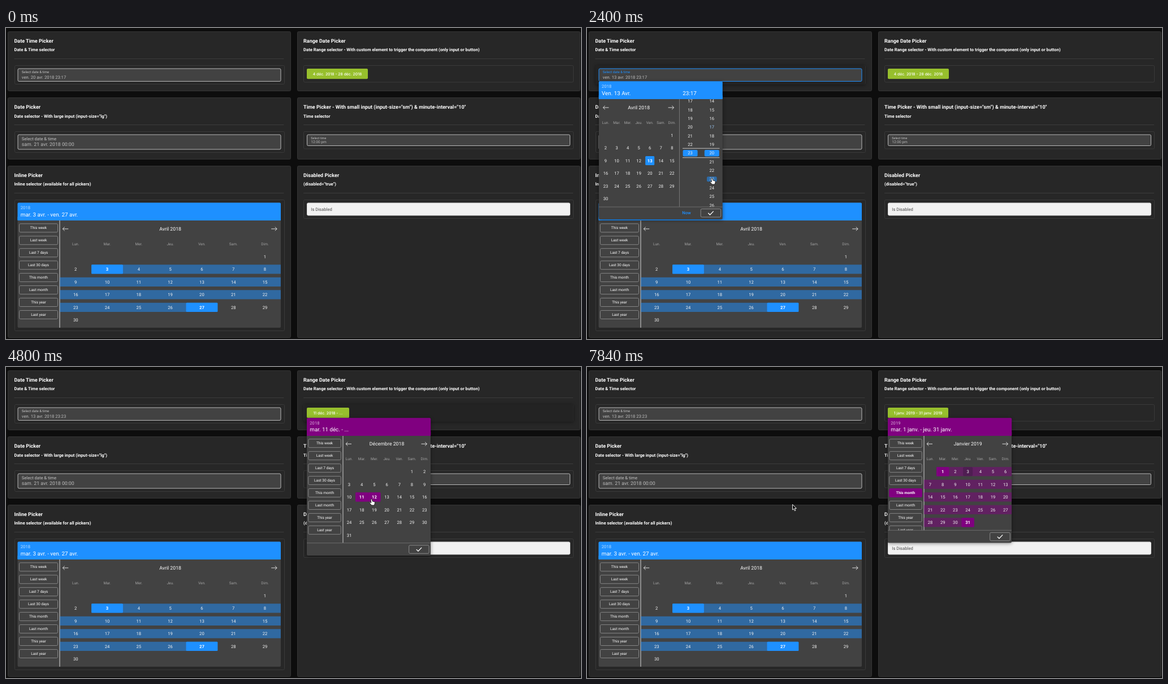
Recreate the animation shown at these times as an HTML page. Size 1017 by 551 pixels, loop 8 s.

```html
<!DOCTYPE html>
<html lang="en">
<head>
<meta charset="utf-8">
<title>Date pickers</title>
<style>
  html, body { margin: 0; width: 100%; height: 100%; overflow: hidden; background: #0d0d0d; }
  svg { display: block; }
  text { font-family: Roboto, sans-serif; text-rendering: geometricPrecision; white-space: pre; }
  .btn { font-family: Inter, sans-serif; }
  .shadow { filter: drop-shadow(0 1px 3px rgba(0, 0, 0, .45)); }
</style>
</head>
<body>
<svg id="stage" width="1017" height="551" viewBox="0 0 1017 551">
  <g id="page"></g>
  <g id="live"></g>
</svg>
<script>
const LOOP = 8000, STEP = 160;
const BLUE = '#1e90ff', PURPLE = '#800080', PANEL = '#424242';
const DAYS = ['lun.', 'mar.', 'mer.', 'jeu.', 'ven.', 'sam.', 'dim.'];
const SHORTCUTS = ['This week', 'Last week', 'Last 7 days', 'Last 30 days',
  'This month', 'Last month', 'This year', 'Last year'];
const APRIL = { name: 'Avril', short: 'avr.', year: 2018, off: 6, len: 30 };
const DECEMBER = { name: 'Décembre', short: 'déc.', year: 2018, off: 5, len: 31 };
const JANUARY = { name: 'Janvier', short: 'janv.', year: 2019, off: 1, len: 31, today: 3 };

// Timelines: the last row whose time has passed applies.
const POPUP1 = [[0, 0, 0], [800, .45, -4.5], [960, .87, -1.7], [1120, 1, 0], [3840, .4, -4], [4000, 0, 0]];
const POPUP2 = [[0, 0, 0], [4000, .6, -4], [4160, 1, -.4], [4320, 1, 0]];
const SCROLL = [[0, 17], [2400, 20], [2560, 22.6], [2720, 23]];
const RANGE = [[0, DECEMBER, 4, 28], [4640, DECEMBER, 11, 0], [5280, DECEMBER, 11, 21],
  [5920, DECEMBER, 1, 31, 5], [6720, JANUARY, 1, 31, 4]];
const BOTTOM = [[0, 334], [6720, 322], [6880, 311.5]];
const CLICKS = [640, 1760, 2240, 3680, 3840, 4640, 5280, 5920, 6720];
// time, x, y, hand
const MOUSE = [[320, 190, 56, 0], [640, 114.3, 85.5, 1], [1120, 114.3, 85.5, 1], [1600, 111, 234, 1],
  [1920, 111, 234, 1], [2240, 221, 266, 1], [2880, 221, 266, 1], [3520, 654, 101, 0],
  [3680, 654, 101, 0], [3840, 618, 82, 1], [4000, 612, 100, 1], [4160, 600, 199.5, 1],
  [4480, 629, 228, 1], [4640, 629, 228, 1], [5120, 696, 251, 1], [5280, 696, 251, 1],
  [5600, 578, 249.5, 1], [5920, 572, 247, 1], [6240, 572, 247, 1], [6720, 566, 224, 1],
  [7360, 566, 224, 1], [7840, 364.5, 244, 0]];

const at = (table, t) => table.filter(row => row[0] <= t).pop().slice(1);

function mouseAt(t) {
  const i = MOUSE.findIndex(k => k[0] >= t);
  if (t < MOUSE[0][0]) return null;
  const b = MOUSE[i], a = MOUSE[Math.max(0, i - 1)];
  const p = b === a ? 1 : (t - a[0]) / (b[0] - a[0]);
  const e = p * p * (3 - 2 * p);
  return { x: a[1] + (b[1] - a[1]) * e, y: a[2] + (b[2] - a[2]) * e, hand: p > .3 ? b[3] : a[3] };
}

// Drawing helpers
const text = (x, y, s, size, o = {}) =>
  `<text x="${x}" y="${y}" font-size="${size}" fill="${o.fill || '#fff'}" font-weight="${o.weight || 400}"` +
  ` text-anchor="${o.mid ? 'middle' : 'start'}" class="${o.cls || ''}">${s.replace(/&/g, '&amp;')}</text>`;

const rect = (x, y, w, h, fill, o = {}) =>
  `<rect x="${x}" y="${y}" width="${w}" height="${h}" rx="${o.r || 0}" fill="${fill}"` +
  ` opacity="${o.alpha || 1}" class="${o.cls || ''}"/>`;

const frame = (x, y, w, h, stroke, fill = 'none', r = 2) =>
  `<rect x="${x + .5}" y="${y + .5}" width="${w - 1}" height="${h - 1}" rx="${r}" fill="${fill}" stroke="${stroke}"/>`;

const path = (d, stroke, width = 1, fill = 'none') =>
  `<path d="${d}" stroke="${stroke}" stroke-width="${width}" fill="${fill}"/>`;

const clip = (x, y, w, h, body) =>
  `<svg x="${x}" y="${y}" width="${w}" height="${h}" viewBox="${x} ${y} ${w} ${h}">${body}</svg>`;

const arrow = (x, y, d) => path(`M${x - 5 * d} ${y}h${10 * d}m${-3.4 * d} -3.3l${3.4 * d} 3.3l${-3.4 * d} 3.3`, '#eee', .9);

function input(x, y, h, label, value, sizes, lines, focus) {
  return frame(x, y, 466, h, focus ? BLUE : '#b8b8b8', PANEL) +
    text(x + 7.3, y + lines[0], label, sizes[0], { fill: focus ? BLUE : '#c4c4c4' }) +
    text(x + 7.3, y + lines[1], value, sizes[1], { fill: '#bcbcbc' });
}

function dayAt(cal, m) {
  if (!m) return 0;
  const col = Math.round((m.x - cal.x) / cal.pitch);
  const row = Math.round((m.y - cal.y - 49) / 22.5);
  if (col < 0 || col > 6 || row < 0 || Math.abs(m.y - cal.y - 49 - row * 22.5) > 8) return 0;
  const d = row * 7 + col - cal.month.off + 1;
  return d > 0 && d <= cal.month.len ? d : 0;
}

function calendar(cal, from, to, accent, hover) {
  const { x, y, pitch, month } = cal;
  const mid = x + 3 * pitch;
  const spot = d => {
    const n = d + month.off - 1;
    return [x + n % 7 * pitch, y + 49 + Math.floor(n / 7) * 22.5];
  };
  let s = arrow(cal.left, y, -1) + arrow(cal.right, y, 1) +
    text(mid, y + 3, `${month.name} ${month.year}`, 8.75, { mid: 1 });
  DAYS.forEach((d, i) => {
    s += text(x + i * pitch, y + 28.9, d[0].toUpperCase() + d.slice(1), 6.56, { mid: 1, fill: '#a3a3a3' });
  });
  if (to > from) {
    for (let d = from; d <= to;) {
      const [cx, cy] = spot(d);
      const n = Math.min(7 - (d + month.off - 1) % 7, to - d + 1);
      s += rect(cx - pitch / 2, cy - 8.1, n * pitch, 16.2, accent, { alpha: .5 });
      d += n;
    }
  }
  for (let d = 1; d <= month.len; d++) {
    const [cx, cy] = spot(d);
    const on = d === from || d === to;
    const w = on && to > from ? pitch : 16;
    if (on) s += rect(cx - w / 2, cy - 8.1, w, 16.2, accent, { r: 1.5 });
    else if (d === hover) s += rect(cx - 8, cy - 8, 16, 16, accent, { r: 2, alpha: .5 });
    else if (d === month.today) s += rect(cx - 8.5, cy - 8, 17, 16, '#4b1c4f', { r: 2, alpha: .8 });
    s += text(cx, cy + 2.7, String(d), 7.66, { mid: 1, weight: on ? 700 : 400, fill: on ? '#fff' : '#f2f2f2' });
  }
  return s;
}

function shortcuts(x, y, w, accent, active, m, before) {
  return SHORTCUTS.map((label, i) => {
    const top = y + i * 21.95;
    const inside = p => p && p.x > x && p.x < x + w && p.y > top && p.y < top + 15.5;
    const on = i === active;
    let s = frame(x, top, w, 16, on ? accent : '#858585', on ? accent : 'none');
    if (!on && inside(m)) {
      const gap = inside(before) ? .5 : 5.5;
      s += rect(x + gap, top + 1, w - 2 * gap, 14, accent, { r: 2, alpha: .5 });
    }
    return s + text(x + w / 2, top + 10.1, label, 6.56, { mid: 1, weight: on ? 700 : 400 });
  }).join('');
}

const header = (x, y, w, accent, year, line) =>
  rect(x, y, w, 31.5, accent, { r: 2 }) + rect(x, y + 25, w, 6.5, accent) +
  text(x + 5.3, y + 11.5, String(year), 7.66, { fill: 'rgba(255,255,255,.7)' }) +
  text(x + 5.3, y + 24, line, 9.8);

const okButton = (x, y) => frame(x, y, 36.5, 15.5, '#8a8a8a') +
  path(`M${x + 13.6} ${y + 7.8}l3.2 3.2l6.2 -6.4`, '#fff', 1.3);

const rangeText = (m, a, b) => {
  const one = d => `${DAYS[(m.off + d - 1) % 7]} ${d} ${m.short}`;
  return `${one(a)} - ${b ? one(b) : '...'}`;
};

const openBox = (x, y, w, h) => rect(x, y, w, h, '#232323', { cls: 'shadow', r: 2 });

// Everything that never changes
function drawPage() {
  const cards = [
    [0, 26, 112, 100, 'Date Time Picker', 'Date & Time selector'],
    [1, 26, 112, 96.5, 'Range Date Picker', 'Date Range selector - With custom element to trigger the component (only input or button)'],
    [0, 143.3, 233, 221, 'Date Picker', 'Date selector - With large input (input-size="lg")'],
    [1, 143.3, 233, 214.5, 'Time Picker - With small input (input-size="sm") & minute-interval="10"', 'Time selector'],
    [0, 264, 549, 537, 'Inline Picker', 'Inline selector (available for all pickers)'],
    [1, 264, 549, 338, 'Disabled Picker', '(disabled="true")']];
  let s = rect(0, 0, 1017, 551, '#0d0d0d');
  for (const [col, y, bottom, box, title, sub] of cards) {
    const x = 3 + col * 511.6, top = Math.round(y - 20);
    s += frame(Math.round(x), top, 501, bottom - top, '#353535', '#272727') +
      text(x + 11.5, y, title, 9, { weight: 700 }) +
      text(x + 11.5, y + 15.3, sub, 7.68, { weight: 700 }) +
      rect(x + 11.5, Math.round(y + 28), 477, 1, '#3c3c3c') +
      frame(Math.round(x + 11.6), Math.round(y + 40), 478, box - Math.round(y + 40), '#3a3a3a');
  }
  s += input(20.5, 188.5, 27, 'Select date & time', 'sam. 21 avr. 2018 00:00', [7.6, 8.75], [10.3, 20.5]) +
    input(532, 188.5, 20.5, 'Select time', '12:00 pm', [5.47, 6.56], [8, 15.8]) +
    frame(532, 309.5, 466, 23, '#d8d8d8', '#f2f2f2') +
    text(539.3, 323.9, 'Is Disabled', 7.66, { fill: '#4a4a4a' });
  s += rect(20.5, 309.5, 465.5, 221.5, PANEL, { r: 2 }) +
    header(20.5, 309.5, 465.5, BLUE, 2018, rangeText(APRIL, 3, 27)) +
    shortcuts(23, 346.3, 69, BLUE, -1) +
    rect(94.5, 341, 1, 190, '#d8d8d8') +
    calendar({ x: 123.2, y: 355.9, pitch: 55.8, left: 105.3, right: 474.2, month: APRIL }, 3, 27, BLUE);
  return s;
}

function timeColumn(x, value, max, hover) {
  let s = rect(x - 13, 216, 26, 11.5, BLUE, { r: 2 });
  for (let n = Math.ceil(value) - 7; n <= Math.min(max, value + 7); n++) {
    const y = 221.7 + (n - value) * 15.35;
    if (n === hover) s += rect(x - 8.8, y - 4.5, 17.6, 9, BLUE, { r: 2, alpha: .55 });
    const fill = n === hover ? '#a9c8ea' : hover && n === 17 ? '#9fcbf8' : '#f2f2f2';
    s += text(x, y + 2.7, String(n), 7.66, { mid: 1, fill });
  }
  return s;
}

function dateTimePopup(t, day, time, m) {
  const [alpha, dy] = at(POPUP1, t);
  if (!alpha) return '';
  const cal = { x: 33, y: 141, pitch: 19.55, left: 33.5, right: 148.6, month: APRIL };
  const minute = at(SCROLL, t)[0];
  const body = rect(21, 94.5, 218.7, 244.5, PANEL, { r: 2, cls: 'shadow' }) +
    header(20.8, 94.5, 218.9, BLUE, 2018, `Ven. ${day} Avr.`) +
    text(169.3, 118.5, time, 9.85) +
    calendar(cal, day, day, BLUE, dayAt(cal, m)) +
    rect(163, 126, 1, 191, '#757575') +
    clip(164, 126, 75, 191, timeColumn(182.6, 23, 23) +
      timeColumn(220.8, minute, 59, t >= 2240 && minute < 23 ? 23 : 0)) +
    rect(169, 212.7, 65.5, 1, '#c4c4c4') + rect(169, 229.2, 65.5, 1, '#c4c4c4') +
    rect(21, 316.5, 218.7, 1, '#6c6c6c') +
    text(176, 330.4, 'Now', 7.66, { mid: 1, fill: BLUE, weight: 500 }) +
    okButton(200.7, 320);
  return `<g opacity="${alpha}" transform="translate(0 ${dy})">${body}</g>`;
}

function rangePopup(t, m, before) {
  const [alpha, dy] = at(POPUP2, t);
  if (!alpha) return '';
  const [month, from, to, active] = at(RANGE, t);
  const bottom = at(BOTTOM, t)[0], foot = bottom - 22;
  const cal = { x: 607, y: 136.3, pitch: 22.2, left: 606, right: 739.5, month };
  const hover = dayAt(cal, m);
  const body = rect(532, 90.5, 219, bottom - 90.5, PANEL, { r: 2, cls: 'shadow' }) +
    header(532, 90.3, 219.2, PURPLE, month.year, rangeText(month, from, to)) +
    clip(532, 122, 219.5, foot - 122,
      shortcuts(534.3, 127.2, 58.5, PURPLE, active, m, before) +
      rect(595.5, 122, 1, 200, '#d0d0d0') +
      calendar(cal, from, to || Math.max(from, hover), PURPLE, hover)) +
    rect(532, foot - .7, 219, 1, '#6c6c6c') +
    okButton(712.2, foot + 3.3);
  return `<g opacity="${alpha}" transform="translate(0 ${dy})">${body}</g>`;
}

function rangeButton(t) {
  const [month, a, b] = at(RANGE, t);
  const w = !b ? 75 : month === JANUARY ? 107 : 108;
  const one = d => `${d} ${month.short} ${month.year}`;
  return rect(532, 72, w, 18.3, '#97bf2d', { r: 2 }) +
    text(532 + w / 2, 83.6, `${one(a)} - ${b ? one(b) : '...'}`, 6.8, { mid: 1, weight: 500, cls: 'btn' });
}

function pointer(t, m) {
  if (!m) return '';
  const ring = CLICKS.includes(t)
    ? `<circle cx="${m.x}" cy="${m.y + .8}" r="12.8" fill="rgba(0,0,0,.25)" stroke="#8c8c8c"/>` : '';
  const shape = m.hand
    ? path('M-1.3 1Q0 -.9 1.2 1L1.8 4L5 4.8Q6.4 5.2 6.1 7L5 11H.3L-3.2 7Q-3.5 5.3 -2.1 5.7L-.5 6.8Z', '#111', .8, '#fff')
    : path('M-1 -.5V9L1.2 7.1L2.8 10.8L4.5 10L2.9 6.5H5.9Z', '#fff', .9, '#111');
  return `${ring}<g transform="translate(${m.x} ${m.y})">${shape}</g>`;
}

function drawLive(t) {
  const m = mouseAt(t), before = mouseAt(t - STEP);
  const day = t < 1760 ? 20 : 13;
  const time = t < 2560 ? '23:17' : '23:23';
  const focus = t >= 640 && t < 3840;
  const open = t >= 4000 && t < 7840;
  return (focus ? openBox(15, 66, 477, 34) : '') +
    (open ? openBox(526.5, 66, 477, 30.5) : '') +
    input(20.5, 71.5, 23.5, 'Select date & time', `ven. ${day} avr. 2018 ${time}`, [6.02, 7.66], [8.7, 18], focus) +
    rangeButton(t) + dateTimePopup(t, day, time, m) + rangePopup(t, m, before) + pointer(t, m);
}

const live = document.getElementById('live');
document.getElementById('page').innerHTML = drawPage();
const start = performance.now();
let shown = -1;

function tick() {
  const t = Math.floor((performance.now() - start) % LOOP / STEP) * STEP;
  if (t !== shown) {
    shown = t;
    live.innerHTML = drawLive(t);
  }
  requestAnimationFrame(tick);
}
tick();
</script>
</body>
</html>
```
